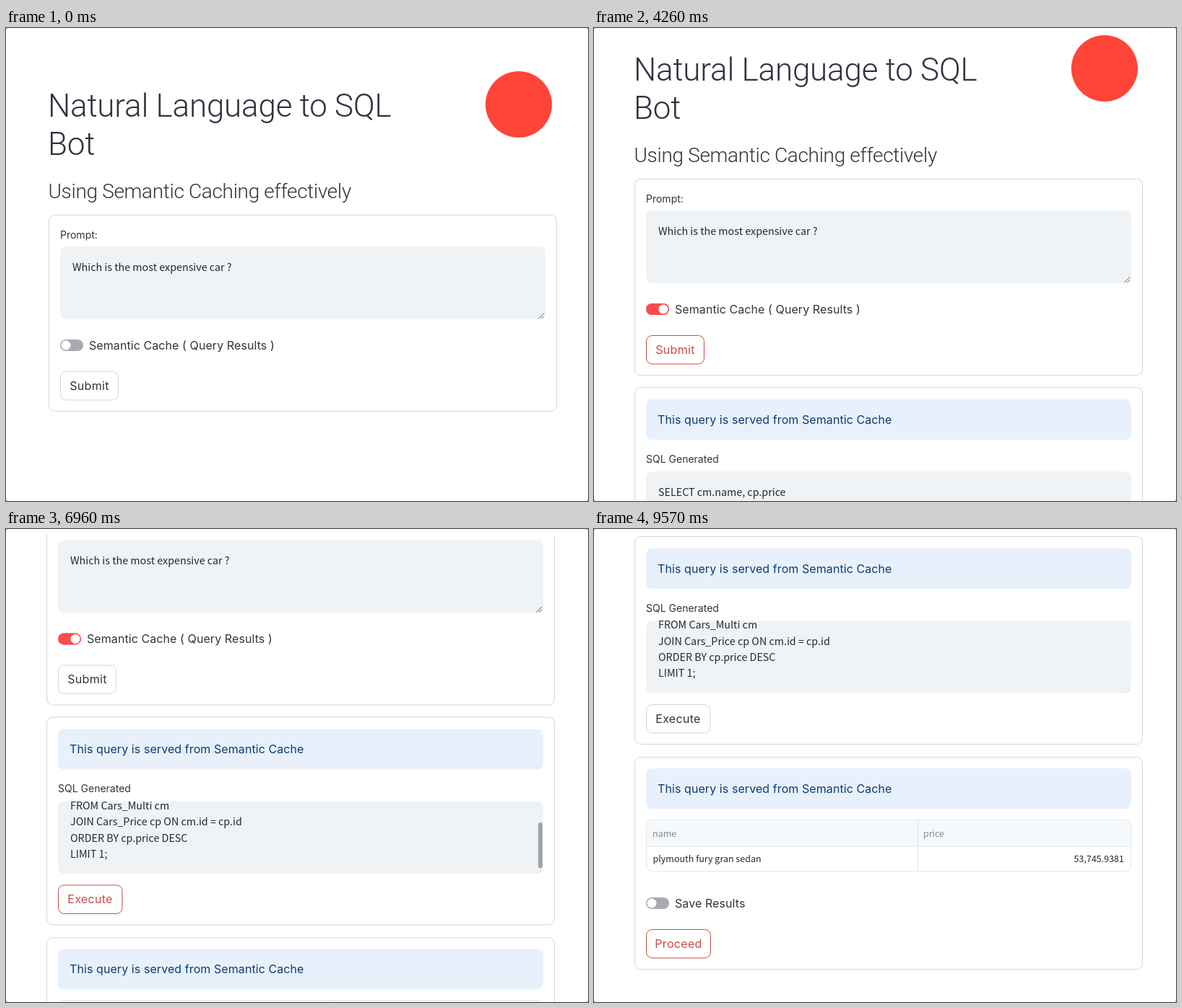
These frames come from a looping animation (806 by 656 pixels, 9.6 s). An HTML page:

```html
<!DOCTYPE html>
<html lang="en">
<head>
<meta charset="utf-8">
<title>Natural Language to SQL Bot</title>
<style>
  html, body { margin: 0; width: 100%; height: 100%; overflow: hidden; background: #888; }
  svg { display: block; }
  text { font: 16px Inter, sans-serif; letter-spacing: .005em; fill: #31333f; }
  .title { font: 300 44px Roboto, sans-serif; letter-spacing: -.005em; }
  .subtitle { font: 300 28px Roboto, sans-serif; letter-spacing: -.012em; }
  .label { font-size: 14px; letter-spacing: 0; }
  .input text { font: 14.3px "Noto Sans CJK JP", "Noto Sans CJK SC", "Noto Sans", sans-serif; letter-spacing: 0; fill: #262730; }
  .cells text { font: 12.5px "Noto Sans CJK JP", "Noto Sans CJK SC", "Noto Sans", sans-serif; letter-spacing: 0; fill: #262730; }
  .cells .head { fill: #85878f; }
  .panel, .button rect { fill: #fff; stroke: #d5d6d9; }
  .field { fill: #eff3f6; }
  .grip { stroke: #55575f; fill: none; }
  .button text { text-anchor: middle; letter-spacing: .02em; }
  .button.hot rect { stroke: #c94b47; }
  .button.hot text { fill: #c94b47; }
  .button.pressed rect { fill: #ff4b4b; stroke: #ff4b4b; }
  .button.pressed text { fill: #fff; }
  .line { stroke: #e3e5e9; fill: none; }
</style>
</head>
<body>
<svg width="806" height="656" viewBox="0 0 806 656">
  <defs>
    <clipPath id="sqlClip"><rect x="72" y="665" width="672" height="100.5" rx="8"/></clipPath>
    <clipPath id="tableClip"><rect x="72.5" y="941.5" width="671" height="71.5" rx="8"/></clipPath>
    <g id="alert">
      <rect x="72" y="565" width="672" height="56" rx="8" fill="#e8f0fc"/>
      <text x="88" y="598.5" style="fill:#0b3d70">This query is served from Semantic Cache</text>
    </g>
  </defs>
  <rect width="806" height="656" rx="3" fill="#fff"/>

  <g id="page">
    <text class="title" x="55" y="122.5">Natural Language to SQL</text>
    <text class="title" x="55" y="175.5">Bot</text>
    <circle cx="707" cy="106" r="46" fill="#ff4438"/>
    <text class="subtitle" x="55.5" y="236">Using Semantic Caching effectively</text>

    <rect class="panel" x="56.5" y="259.5" width="703" height="272" rx="8"/>
    <text class="label" x="72" y="292">Prompt:</text>
    <g class="input">
      <rect class="field" x="72" y="303" width="672" height="101" rx="8"/>
      <text x="89" y="336.5">Which is the most expensive car ?</text>
      <path class="grip" d="M734.5 403l7.5-7.5M738.5 403l3.5-3.5"/>
    </g>
    <rect x="72" y="432" width="32" height="16" rx="8" fill="#a9a9b2"/>
    <rect id="track" x="72" y="432" width="32" height="16" rx="8" fill="#ff4b4b"/>
    <circle id="knob" cx="80" cy="440" r="6.5" fill="#fff"/>
    <text x="112" y="446">Semantic Cache ( Query Results )</text>
    <g class="button" id="submit">
      <rect x="72.5" y="476.5" width="80" height="39.5" rx="8"/>
      <text x="112.5" y="501.5">Submit</text>
    </g>

    <g id="queryPanel">
      <rect class="panel" x="56.5" y="548.5" width="703" height="288" rx="8"/>
      <use href="#alert" id="queryAlert"/>
      <text class="label" x="72" y="653">SQL Generated</text>
      <g class="input" clip-path="url(#sqlClip)">
        <rect class="field" x="72" y="665" width="672" height="101"/>
        <g id="sql">
          <text x="89" y="698.5">SELECT cm.name, cp.price</text>
          <text x="89" y="720.9">FROM Cars_Multi cm</text>
          <text x="89" y="743.3">JOIN Cars_Price cp ON cm.id = cp.id</text>
          <text x="89" y="765.7">ORDER BY cp.price DESC</text>
          <text x="89" y="788.1">LIMIT 1;</text>
        </g>
        <rect id="thumb" x="737" y="667" width="6" height="63.5" rx="3" fill="#a2a4a7"/>
      </g>
      <path class="grip" d="M738.5 764l3.5-3.5" stroke-dasharray="1 2" opacity=".6"/>
      <g class="button" id="execute">
        <rect x="72.5" y="781.5" width="88.5" height="39.5" rx="8"/>
        <text x="116.5" y="807">Execute</text>
      </g>
    </g>

    <g id="resultPanel">
      <rect class="panel" x="56.5" y="854.5" width="703" height="294" rx="8"/>
      <use href="#alert" id="resultAlert" y="305"/>
      <g class="cells">
        <rect x="72" y="941" width="672" height="37" fill="#f6f9fc" clip-path="url(#tableClip)"/>
        <rect class="line" x="72.5" y="941.5" width="671" height="71.5" rx="8"/>
        <path class="line" d="M72.5 978h671M448.5 942v71"/>
        <text class="head" x="81" y="964.5">name</text>
        <text class="head" x="456" y="964.5">price</text>
        <text x="81.5" y="999.5">plymouth fury gran sedan</text>
        <text x="734" y="999.5" text-anchor="end">53,745.9381</text>
      </g>
      <rect x="72" y="1049" width="32" height="16" rx="8" fill="#a9a9b2"/>
      <circle cx="80" cy="1057" r="6.5" fill="#fff"/>
      <text x="112" y="1063">Save Results</text>
      <g class="button" id="proceed">
        <rect x="72.5" y="1093.5" width="89" height="39.5" rx="8"/>
        <text x="117" y="1118.5">Proceed</text>
      </g>
    </g>
  </g>

  <rect x="3" width="800" height="8" fill="#fff"/>
</svg>
<script>
const LOOP = 9600;
const $ = id => document.getElementById(id);
const within = (t, from, to) => t >= from && t < to;
const linear = (t, from, to) => Math.min(1, Math.max(0, (t - from) / (to - from)));
const smooth = (t, from, to) => {
  const p = linear(t, from, to);
  return p * p * (3 - 2 * p);
};
const move = (id, x, y) => $(id).setAttribute("transform", `translate(${x} ${y})`);
const fade = (id, opacity) => $(id).setAttribute("opacity", opacity);

// Each button: hover, press, release and loss of focus, in ms
const buttons = {
  submit: [2130, 2610, 2640, 5460],
  execute: [4980, 5460, 5550, 8910],
  proceed: [8310, 8910, 9000, LOOP],
};

function render(t) {
  const scroll = 227 * smooth(t, 4170, 4470) + 311 * smooth(t, 6780, 7420);
  move("page", t < 3840 ? 3 : 0, -scroll);

  const on = smooth(t, 1650, 1890);
  fade("track", on);
  move("knob", 16 * on, 0);

  fade("queryPanel", +(t >= 3840));
  fade("queryAlert", linear(t, 3860, 4020));
  fade("resultPanel", +(t >= 6510));
  fade("resultAlert", linear(t, 6510, 6600));

  const sqlScroll = smooth(t, 6030, 6180);
  move("sql", 0, -44.6 * sqlScroll);
  move("thumb", 0, 27.5 * sqlScroll);
  fade("thumb", t < 5790 ? 0 : 1 - linear(t, 7500, 7740));

  for (const [id, [hover, press, release, blur]] of Object.entries(buttons)) {
    $(id).classList.toggle("hot", within(t, hover, blur));
    $(id).classList.toggle("pressed", within(t, press, release));
  }
}

const start = performance.now();
function frame() {
  render((performance.now() - start) % LOOP);
  requestAnimationFrame(frame);
}
frame();
</script>
</body>
</html>
```
